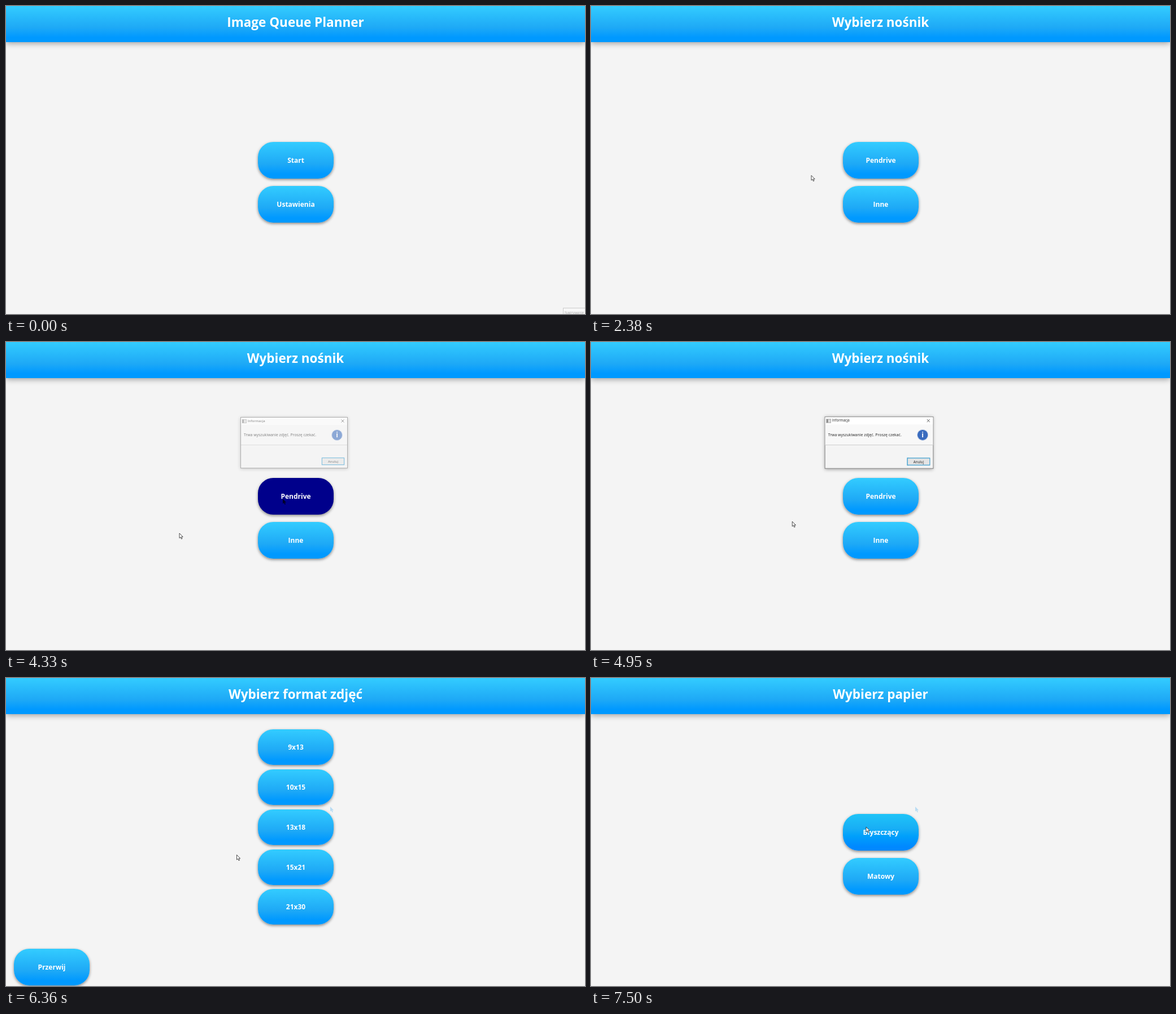
An HTML page that plays this animation: 1025x546 px, repeating every 7.99 s.

```html
<!DOCTYPE html>
<html lang="pl">
<head>
<meta charset="utf-8">
<title>Image Queue Planner</title>
<style>
  html, body { margin: 0; width: 100%; height: 100%; overflow: hidden; background: #f4f4f4; }
  body { position: relative; font-family: "Open Sans", "Noto Sans", sans-serif; }
  .abs, header, .btn, .dialog, .dialog *, svg { position: absolute; box-sizing: border-box; }
  header, .btn {
    background: linear-gradient(#33ccff, #1ea9f6 60%, #0099ff 87%);
    color: #fff; font-weight: 700; text-align: center;
  }
  header {
    left: 0; top: 0; width: 1025px; height: 64px;
    font-size: 22.5px; line-height: 58px;
    box-shadow: 0 2px 10px rgba(0, 0, 0, .38);
  }
  .btn {
    width: 134px; border-radius: 27px; font-size: 12px;
    box-shadow: 0 2px 5px rgba(0, 0, 0, .45);
  }
  .btn.hover { background: linear-gradient(#20c4f8, #18aef5 40%, #00a0fb 60%, #0088ff 90%); }
  .btn.down { background: #00008b; }
  .tip {
    left: 986px; top: 535px; width: 50px; height: 20px; padding-left: 2px;
    border: 1px solid #ccc; background: #f7f7f7; color: #aaa;
    font-size: 6.2px; line-height: 15px;
  }
  .dialog {
    left: 415px; top: 133px; width: 190px; height: 91px;
    border: 1px solid #777; background: #f4f4f4; color: #222;
    box-shadow: 0 1px 6px rgba(0, 0, 0, .35); white-space: nowrap;
  }
  .bar { left: 0; top: 0; width: 188px; height: 13px; background: #fff; }
  .head { left: 0; top: 13px; width: 188px; height: 36px; background: #f8f8f8; border-bottom: 1px solid #ccc; }
  .app { left: 2px; top: 3px; width: 8px; height: 7px; background: #ddd; border: 1px solid #aaa; border-left: 3px solid #888; }
  .name { left: 12px; top: 0; font-size: 6.1px; line-height: 12px; }
  .msg { left: 5px; top: 0; font-size: 6.85px; line-height: 35px; }
  .info {
    left: 160px; top: 8px; width: 20px; height: 20px; border-radius: 50%;
    background: #3a6cbf; border: 1px solid #cdd8ea; color: #fff;
    font: 700 12px/17px "Open Sans", sans-serif; text-align: center;
  }
  .cancel {
    left: 143px; top: 71px; width: 40px; height: 13px; border: 1px solid #2f9bd0;
    background: #e4e4e4; box-shadow: 0 0 1px #2f9bd0;
    font-size: 6.1px; line-height: 11px; text-align: center;
  }
  .spot { width: 13px; height: 13px; margin: -7px 0 0 -6.5px; border-radius: 50%; background: rgba(255, 255, 0, .55); }
  svg { left: 0; top: 0; overflow: visible; }
</style>
</head>
<body>
<header></header>
<main></main>
<div class="abs tip">Nagrywanie</div>
<div class="dialog">
  <div class="bar">
    <i class="app"></i><span class="name">Informacja</span>
    <svg width="188" height="13"><path d="M177.500 3.500l5 5m0-5l-5 5" stroke="#333" stroke-width=".8"/></svg>
  </div>
  <div class="head"><span class="msg">Trwa wyszukiwanie zdjęć. Proszę czekać.</span><b class="info">i</b></div>
  <div class="cancel">Anuluj</div>
</div>
<div class="abs spot"></div>
<svg width="1025" height="546">
  <defs><path id="arrow" d="M0 0V8.700L2 6.900L3.500 10.200L5 9.500L3.500 6.400H6.200Z"/></defs>
  <use id="darkGhost" href="#arrow" x="490" y="278" fill="#000028"/>
  <use id="paleGhost" href="#arrow" x="574" y="228" fill="#b9dcf3"/>
  <use id="cursor" href="#arrow" fill="#fff" stroke="#222" stroke-width=".8"/>
</svg>
<script>
const LOOP = 7990;
const $ = s => document.querySelector(s);
const header = $('header'), main = $('main'), tip = $('.tip'), dialog = $('.dialog'), spot = $('.spot');
const cursor = $('#cursor'), darkGhost = $('#darkGhost'), paleGhost = $('#paleGhost');

const pair = (a, b) => [[a, 446, 241, 65], [b, 446, 319, 65]];
const sizes = ['9x13', '10x15', '13x18', '15x21', '21x30'];

// start time, title, buttons as [label, x, y, height]
const screens = [
  [0, 'Image Queue Planner', pair('Start', 'Ustawienia')],
  [1900, 'Wybierz nośnik', pair('Pendrive', 'Inne')],
  [5750, 'Wybierz format zdjęć', [
    ...sizes.map((s, i) => [s, 446, 91 + i * 70.85, 63]),
    ['Przerwij', 14, 480, 65]
  ]],
  [6970, 'Wybierz papier', pair('Błyszczący', 'Matowy')]
];

// start, end, number of steps, destination
const moves = [
  [70, 470, 7, 731, 341],
  [670, 1160, 8, 521, 270],
  [2100, 2310, 4, 357, 305],
  [2380, 2520, 3, 484.5, 287],
  [2990, 3270, 5, 490, 278],
  [3680, 4330, 10, 307, 339],
  [4790, 5480, 11, 577, 225],
  [5750, 6360, 9, 408.5, 313.5],
  [6440, 6640, 4, 470, 146],
  [6700, 6760, 2, 478, 203],
  [7160, 7500, 6, 487, 264]
];

// press time, release time
const clicks = [[1760, 1900], [2710, 2920], [3540, 4400], [6760, 6970]];

const within = (t, a, b) => t >= a && t < b;
const show = (el, on) => { el.style.display = on ? '' : 'none'; };
const ease = u => u * u * (3 - 2 * u);

function cursorAt(t) {
  let x = 1025, y = 546;
  for (const [a, b, n, tx, ty] of moves) {
    if (t < a) break;
    const step = Math.floor((t - a) / (b - a) * (n - 1) + 1e-6) + 1;
    const u = ease(Math.min(1, step / n));
    x += (tx - x) * u;
    y += (ty - y) * u;
  }
  return [x, y];
}

function dialogAlpha(t) {
  if (!within(t, 4260, 5680)) return 0;
  if (t < 4330) return .25;
  if (t < 4400) return .55;
  if (t < 4470) return .8;
  return t < 5610 ? 1 : .4;
}

let current, buttons = [];
function setScreen(screen) {
  if (screen === current) return;
  current = screen;
  header.textContent = screen[1];
  main.replaceChildren();
  buttons = screen[2].map(([label, x, y, h]) => {
    const el = document.createElement('div');
    el.className = 'btn';
    el.textContent = label;
    Object.assign(el.style, { left: x + 'px', top: y + 'px', height: h + 'px', lineHeight: h + 'px' });
    main.append(el);
    return { el, x, y, h };
  });
}

function draw(t) {
  setScreen(screens.filter(s => t >= s[0]).pop());
  const [x, y] = cursorAt(t);
  const down = clicks.some(([a, b]) => within(t, a + 70, b));
  const modal = within(t, 3610, 5680);
  const [px, py] = within(t, 3610, 4400) ? [490, 278] : [x, y];

  for (const b of buttons) {
    const over = px >= b.x && px <= b.x + 134 && py >= b.y && py <= b.y + b.h;
    b.el.classList.toggle('hover', over && !modal);
    b.el.classList.toggle('down', over && down);
  }

  show(cursor, t >= 70);
  cursor.setAttribute('x', x);
  cursor.setAttribute('y', y);
  show(spot, clicks.some(([a]) => within(t, a, a + 70)));
  spot.style.left = x + 'px';
  spot.style.top = y + 'px';

  show(tip, t < 140);
  show(darkGhost, within(t, 3680, 4400));
  show(paleGhost, t >= 5820);

  const alpha = dialogAlpha(t);
  show(dialog, alpha > 0);
  dialog.style.opacity = alpha;
  dialog.style.transform = `scale(${1 + Math.max(0, alpha - .55) * .033})`;
}

const origin = performance.now();
function tick() {
  draw((performance.now() - origin) % LOOP);
  requestAnimationFrame(tick);
}
draw(0);
tick();
</script>
</body>
</html>
```
